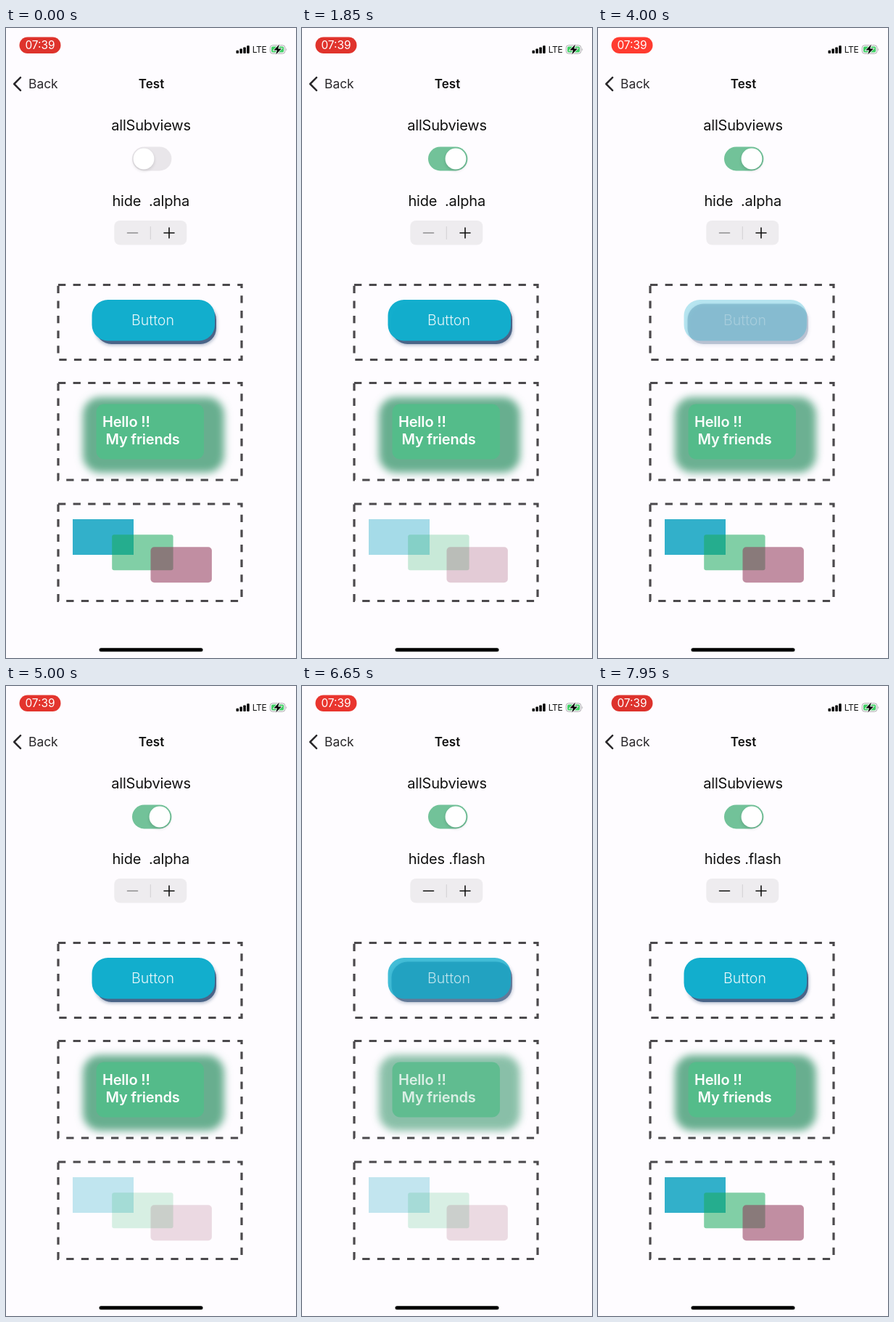
These frames come from a looping animation (400 by 867 pixels, 8 s). An HTML page:

```html
<!DOCTYPE html>
<html lang="en">
<head>
<meta charset="utf-8">
<style>
  html, body { margin: 0; width: 100%; height: 100%; overflow: hidden; background: #fefcff; }
  svg { display: block; width: 100vw; height: 100vh; font-family: Inter, Roboto, sans-serif; }
  text { white-space: pre; fill: #111; }
  .mid { text-anchor: middle; }
  .title { font-size: 20px; letter-spacing: -.01em; }
  .frame { fill: none; stroke: #4b494c; stroke-width: 3.2; stroke-dasharray: 10.3; }
  .line { fill: none; stroke: #111; stroke-width: 1.6; stroke-linecap: round; }
  .hello { fill: #fff; font-size: 20px; font-weight: 600; letter-spacing: -.01em; }
</style>
</head>
<body>
<svg viewBox="0 0 400 867">
  <defs>
    <filter id="glow" x="-20%" y="-25%" width="140%" height="150%"><feGaussianBlur stdDeviation="5.5"/></filter>
    <filter id="soft" x="-10%" y="-20%" width="120%" height="140%"><feGaussianBlur stdDeviation="2.2"/></filter>
    <filter id="edge" x="-5%" y="-5%" width="110%" height="110%"><feGaussianBlur stdDeviation=".7"/></filter>
  </defs>

  <rect id="pill" x="18.5" y="12.5" width="57" height="22.5" rx="11.2"/>
  <text class="mid" x="47" y="29.2" font-size="15.4" style="fill:#fff">07:39</text>
  <g id="bars"></g>
  <text class="mid" x="349.5" y="34.2" font-size="12" letter-spacing="-.3">LTE</text>
  <rect x="364.3" y="23.8" width="20.6" height="11.4" rx="3.4" fill="#fefcff" stroke="#aaa8ac"/>
  <rect x="366" y="25.5" width="17.2" height="8" rx="1.8" fill="#42cf66"/>
  <path d="M386.4 27.5q1.6 2 0 4z" fill="#aaa8ac"/>
  <path d="M377 22.5L369.4 30.6H374L372.2 36.5L380 28.4H375.2Z" stroke="#fefcff" stroke-width="1.6" paint-order="stroke"/>

  <path d="M20 68.2L11.2 77L20 85.8" fill="none" stroke="#2a282b" stroke-width="2.5" stroke-linecap="round" stroke-linejoin="round"/>
  <text x="31" y="83.2" font-size="17.4" style="fill:#2a282b">Back</text>
  <text class="mid" x="200.5" y="83.2" font-size="17" font-weight="600">Test</text>

  <text class="mid title" x="200" y="140.5">allSubviews</text>
  <rect id="track" x="174" y="163.6" width="54.4" height="32.8" rx="16.4"/>
  <circle cx="1" cy="2" r="14.5" id="shade" fill="#000" opacity=".13" filter="url(#soft)"/>
  <circle id="knob" cy="180" r="14.4" fill="#fff"/>

  <text id="mode" class="mid title" x="199.7" y="244.5"></text>
  <rect x="149.3" y="265" width="100" height="33.5" rx="8" fill="#eeecef"/>
  <path d="M199.3 273V291" stroke="#d2d0d3"/>
  <path id="minus" class="line" d="M167.5 282H181.5"/>
  <path class="line" d="M218 282H232M225 275V289"/>

  <path class="frame" d="M72 353.5H325V456.5H72Z"/>
  <path class="frame" d="M72 488.5H325V622H72Z"/>
  <path class="frame" d="M72 655H325V788.5H72Z"/>

  <g class="view">
    <rect data-a=".4" x="123" y="380" width="168" height="57" rx="22" fill="#4a6488" filter="url(#soft)"/>
    <rect data-a="1" x="123.5" y="379.5" width="166.5" height="55.5" rx="22" fill="#4a6488"/>
    <rect data-a="1" x="118.5" y="374" width="169.5" height="56.5" rx="22" fill="#12aecd"/>
    <text data-a=".9" class="mid" x="202.5" y="408.8" font-size="19.6" font-weight="300" style="fill:#fff">Button</text>
  </g>

  <g class="view">
    <rect data-a="1" x="106" y="508" width="195" height="104" rx="24" fill="#68ae8f" filter="url(#glow)"/>
    <rect data-a="1" x="124.5" y="517.5" width="148.5" height="76" rx="11" fill="#54bc8a" filter="url(#edge)"/>
    <text data-a="1" class="hello" x="133" y="548.5">Hello !!</text>
    <text data-a="1" class="hello" x="137.5" y="572.6">My friends</text>
  </g>

  <g class="view">
    <rect data-a="1" x="92" y="676" width="84" height="49" fill="#32b0ca"/>
    <rect data-a=".55" x="146.2" y="697.3" width="84.4" height="49" rx="3" fill="#1dab5d"/>
    <rect data-a=".55" x="199.5" y="714.3" width="84.4" height="49" rx="5" fill="#903557" filter="url(#edge)"/>
  </g>

  <rect x="128.5" y="853.2" width="143" height="5" rx="2.5"/>
</svg>
<script>
const LOOP = 8000;
const $ = id => document.getElementById(id);
const clamp = v => Math.min(1, Math.max(0, v));
const ease = v => { v = clamp(v); return v * v * (3 - 2 * v); };
const mix = (a, b, k) => `rgb(${a.map((v, i) => Math.round(v + (b[i] - v) * k))})`;
const dip = phase => (1 - Math.cos(2 * Math.PI * phase)) / 2;

for (let i = 0; i < 4; i++) {
  const h = 4.2 + i * 2.2;
  $('bars').innerHTML += `<rect x="${317.5 + i * 4.9}" y="${35 - h}" width="3.5" height="${h}" rx=".9"/>`;
}

// Centres of the first slow fade and starts of the double flash, in ms.
const timing = [
  { fade: 720, flash: 5710 },
  { fade: 1200, flash: 6000 },
  { fade: 1690, flash: 6185 }
];
const views = [...document.querySelectorAll('.view')].map((el, i) => ({ parts: [...el.children], ...timing[i] }));

function alpha(t, { fade, flash }) {
  let a = 1;
  for (let n = 0; n < 3; n++) {
    const p = (t - fade - n * 1640) / 1100 + .5;
    if (p > 0 && p < 1) a = 1 - .7 * dip(p);
  }
  const q = (t - flash) / 800;
  if (q > 0 && q < 2) a = 1 - .75 * dip(q);
  return a;
}

function draw(t) {
  $('pill').setAttribute('fill', mix([220, 50, 44], [255, 59, 48], 1 - dip((t - 4000) / 1550)));

  const on = ease((t - 150) / 250);
  const x = 190 + 22 * on;
  $('track').setAttribute('fill', mix([233, 230, 234], [114, 194, 153], on));
  $('knob').setAttribute('cx', x);
  $('shade').setAttribute('transform', `translate(${x - 1} 180)`);

  const flashing = t >= 5500;
  $('mode').textContent = flashing ? 'hides .flash' : 'hide  .alpha';
  $('minus').style.stroke = flashing ? '#111' : '#8f8d90';

  for (const view of views) {
    const a = alpha(t, view);
    for (const part of view.parts) part.setAttribute('opacity', part.dataset.a * a);
  }
}

const start = performance.now();
function tick(now) {
  draw(Math.max(0, now - start) % LOOP);
  requestAnimationFrame(tick);
}
draw(0);
requestAnimationFrame(tick);
</script>
</body>
</html>
```
